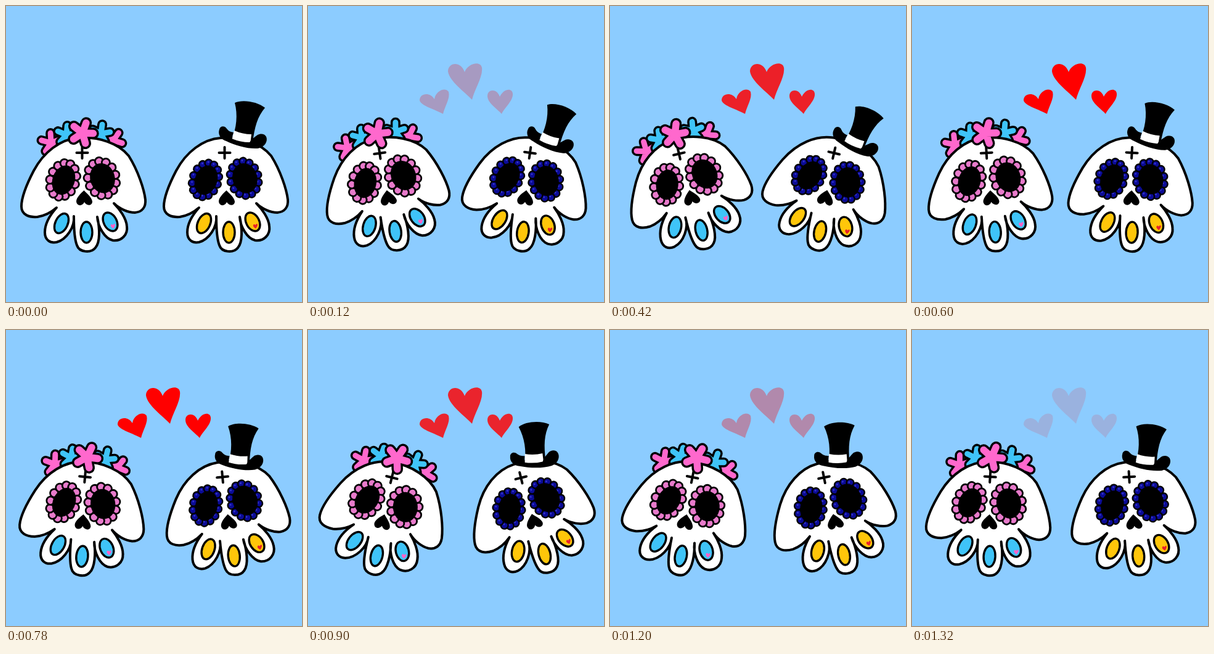
These frames come from a looping animation (480x480 px, 1.38 s). An HTML page:

```html
<!DOCTYPE html>
<html lang="en">
<head>
<meta charset="utf-8">
<title>Sugar skulls</title>
<style>
  html, body { margin: 0; width: 100%; height: 100%; overflow: hidden; background: #8cccff; }
  svg { display: block; width: 100%; height: 100%; }
  .line { stroke: #000; stroke-width: 4; stroke-linecap: round; stroke-linejoin: round; }
  .tooth { fill: currentColor; stroke: #000; stroke-width: 3.4; }
  .pink { fill: #e87acb; stroke: #000; stroke-width: 2.8; }
  .bead { fill: #0b0b96; stroke: #000; stroke-width: 2.4; }
  .shine { fill: #3434cc; }
</style>
</head>
<body>
<svg viewBox="0 0 480 480">
  <defs>
    <g id="skull">
      <path class="line" fill="#fff" d="M117 214C88 216 61 237 45 267C33 290 25 310 25 325C25 339 38 343 51 342C64 340 74 334 82 327C73 337 63 352 63 367C63 380 72 385 82 383C98 379 112 358 110 341C110 356 111 378 115 388C119 400 138 401 145 392C153 383 152 360 148 342C149 358 160 377 173 380C187 382 198 371 196 357C195 344 184 329 175 320C184 329 198 335 209 335C221 334 227 326 226 314C224 297 214 267 199 243C183 223 150 211 117 214Z"/>
      <path class="line" d="M114.500 238h18M123.500 229v18"/>
      <path d="M126.500 299C121 304 114 311 114 317C115 325 124 325 127 318C131 325 140 324 140 317C139 310 131 304 126.500 299Z"/>
      <ellipse class="tooth" rx="10" ry="17" transform="translate(90 352.500) rotate(25)"/>
      <ellipse class="tooth" rx="9.5" ry="17" transform="translate(130.500 367)"/>
      <ellipse class="tooth" rx="10.500" ry="16" transform="translate(169 350) rotate(-28)"/>
    </g>
    <path id="speck" d="M174 361C171 359 169 357 170 355C171 353 173 354 173.500 355.500C174.500 352.500 177 352.500 177 355C177 357 175 359 174 361Z"/>
  </defs>
  <g id="bride" color="#3fc4f8">
    <g id="wreath"></g>
    <use href="#skull"/>
    <use href="#speck" fill="#ff62c8"/>
    <g id="crown"></g>
  </g>
  <g id="groom" color="#ffc60a">
    <g id="face" transform="translate(231)">
      <use href="#skull"/>
      <use href="#speck" fill="#e8202a"/>
    </g>
    <path d="M371 157C383 151 408 155 420 165C408 179 403 196 400 222L366 216C374 198 376 176 371 157Z"/>
    <path fill="#fff" d="M370 202Q384 208 398 208L396 224L366 218Z"/>
    <path d="M346 200C343 208 348 216 357 219C372 226 392 232 408 231C420 229 425 219 422 212C419 206 411 207 408 209C404 212 401 214 398 217L395 221Q380 221 366 215L369 205C364 204 361 203 358 199C354 193 347 195 346 200Z"/>
  </g>
  <g id="hearts" fill="#f00">
    <path d="M266 152C255 140 229 122 227 106C227 92 247 88 254 107C259 93 280 88 282 100C284 115 270 135 266 152Z"/>
    <path d="M219 175C207 168 183 162 181 153C181 141 198 139 205 151C207 138 222 131 228 139C231 150 222 162 219 175Z"/>
    <path d="M314 175C306 166 291 157 291 146C291 135 306 133 311 147C317 134 331 132 332 142C333 154 319 164 314 175Z"/>
  </g>
</svg>
<script>
  const $ = id => document.getElementById(id);
  const LOOP = 1380, STEP = 60;

  function add(parent, tag, attrs) {
    const el = document.createElementNS('http://www.w3.org/2000/svg', tag);
    for (const k in attrs) el.setAttribute(k, attrs[k]);
    return parent.appendChild(el);
  }

  // Five round petals: black spokes beneath thinner coloured ones
  function flower(parent, x, y, len, width, turn, color) {
    let d = '';
    for (let i = 0; i < 5; i++) {
      const a = (turn + i * 72) * Math.PI / 180;
      d += `M${x} ${y}l${(len * Math.cos(a)).toFixed(2)} ${(len * Math.sin(a)).toFixed(2)}`;
    }
    for (const [stroke, w] of [['#000', width + 7], [color, width]])
      add(parent, 'path', { d, stroke, 'stroke-width': w, 'stroke-linecap': 'round' });
  }

  function eye(parent, x, y, rx, tilt, beads) {
    const g = add(parent, 'g', { transform: `translate(${x} ${y}) rotate(${tilt})` });
    const n = beads ? 14 : 13, ry = 28;
    const pupil = (w, h) => add(g, 'ellipse', { cx: 1, rx: w, ry: h });
    if (beads) pupil(rx, ry);
    for (let i = 0; i < n; i++) {
      const a = i / n * 2 * Math.PI;
      const cx = rx * Math.cos(a), cy = ry * Math.sin(a);
      add(g, 'circle', { cx, cy, r: beads ? 6 : 6.6, class: beads ? 'bead' : 'pink' });
      if (beads) add(g, 'circle', { cx: cx - 1, cy: cy - 1.5, r: 1.5, class: 'shine' });
    }
    pupil(rx - 2.5, ry - 3.5);
  }

  const PINK = '#ff68cd', BLUE = '#3fc4f8';
  flower($('wreath'), 73, 222, 16, 9, 123, PINK);
  flower($('wreath'), 174, 218, 15, 9, -55, PINK);
  flower($('wreath'), 98, 209, 15, 9, 131, BLUE);
  flower($('wreath'), 154, 207, 15, 9, -82, BLUE);
  flower($('crown'), 124, 206, 17.5, 11.5, -70, PINK);
  for (const [head, beads] of [['bride', false], ['face', true]]) {
    eye($(head), 92.5, 282, 20.5, 20, beads);
    eye($(head), 155.5, 279.5, 22.5, -15, beads);
  }

  // Sway in degrees over one loop, joined smoothly
  const sway = [[0, 0], [240, 14.7], [420, 13.2], [600, 3.1], [780, -5.2], [1020, -19.5], [1320, -3.6]];

  function knot(i) {
    const n = sway.length, k = (i + n) % n;
    return [sway[k][0] + Math.floor(i / n) * LOOP, sway[k][1]];
  }

  function slope(i) {
    const [t0, a0] = knot(i - 1), [t1, a1] = knot(i + 1);
    return (a1 - a0) / (t1 - t0);
  }

  function angle(t) {
    let i = sway.length - 1;
    while (sway[i][0] > t) i--;
    const [t0, a0] = knot(i), [t1, a1] = knot(i + 1);
    const h = t1 - t0, p = (t - t0) / h, q = 1 - p;
    return a0 * (1 + 2 * p) * q * q + a1 * (3 - 2 * p) * p * p
      + h * p * q * (slope(i) * q - slope(i + 1) * p);
  }

  function draw(now) {
    const t = Math.floor(now % LOOP / STEP) * STEP;
    const a = angle(t);
    $('bride').setAttribute('transform', `rotate(${-a} 125 289)`);
    $('groom').setAttribute('transform', `rotate(${a} 357 276)`);
    $('hearts').setAttribute('opacity', Math.max(0, Math.min(1, t / 500, (1392 - t) / 600)));
  }

  let start;
  function tick(now) {
    start ??= now;
    draw(now - start);
    requestAnimationFrame(tick);
  }
  draw(0);
  requestAnimationFrame(tick);
</script>
</body>
</html>
```
